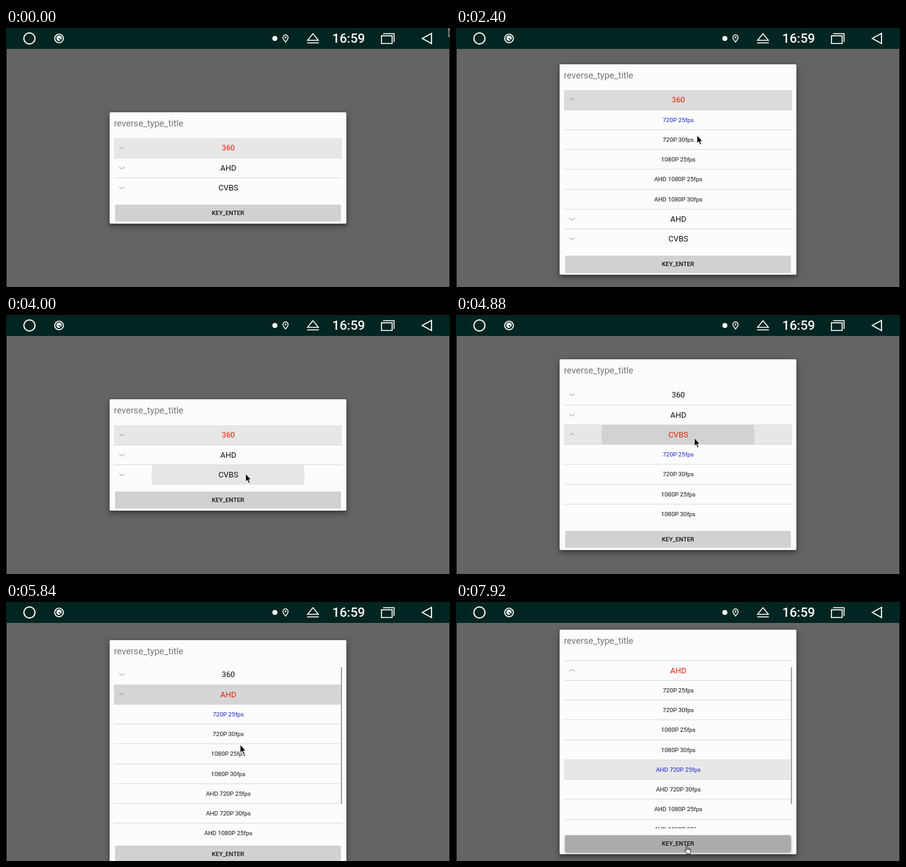
Recreate the animation shown at these times as an HTML page. Size 720 by 421 pixels, loop 8 s.

```html
<!DOCTYPE html>
<html lang="en">
<head>
<meta charset="utf-8">
<title>Reverse type dialog</title>
<style>
html, body { margin: 0; width: 100%; height: 100%; overflow: hidden; background: #000; }
#stage { position: absolute; left: 0; top: 0; width: 720px; height: 421px; overflow: hidden; font-family: Roboto, sans-serif; }
#stage div, #stage svg { position: absolute; box-sizing: border-box; }
#dim { left: 1px; top: 33px; width: 718px; height: 388px; background: #646464; }
#bar { left: 0; top: 0; width: 720px; height: 34px; background: #022521; }
#icons, #pointer { left: 0; top: 0; overflow: visible; }
#clock { left: 529px; top: 4px; width: 53px; line-height: 26px; font-size: 21px; font-weight: 500; color: #fff; white-space: nowrap; }
#dialog { left: 168px; top: 0; width: 384px; background: #fcfcfc; border-radius: 2px; box-shadow: 0 3px 6px rgba(0,0,0,.3), 0 4px 12px rgba(0,0,0,.24); }
#title { left: 7px; top: 8.4px; line-height: 20px; font-size: 14.6px; color: #757575; }
#list { left: 7px; top: 42.3px; width: 370px; overflow: hidden; }
#rows { left: 0; top: 0; width: 370px; }
.row { left: 0; width: 370px; height: 32.25px; line-height: 32.25px; padding-left: 1px; text-align: center; color: #111; font-size: 9.85px; border-bottom: 1px solid #dadada; overflow: hidden; white-space: nowrap; }
.row:last-of-type { border-bottom: 0; }
.row.group { font-size: 12.8px; }
.row.on { background: #e7e7e7; }
.row.red { color: #e5220e; }
.row.blue { color: #1620cc; }
.row span { position: relative; }
.row svg { left: 8px; top: 13px; }
.row svg.up { top: 12px; }
.ripple { border-radius: 50%; background: #000; }
#thumb { left: 367.5px; width: 3px; background: #9fa2a1; }
#button { left: 9px; width: 366px; height: 27.5px; line-height: 27px; text-align: center; font-size: 9.9px; font-weight: 500; color: #111; border-radius: 1.5px; }
</style>
</head>
<body>
<div id="stage">
  <div id="dim"></div>
  <div id="dialog">
    <div id="title">reverse_type_title</div>
    <div id="list"><div id="rows"></div><div id="thumb"></div></div>
    <div id="button">KEY_ENTER</div>
  </div>
  <div id="bar"></div>
  <svg id="icons" width="720" height="34" fill="none" stroke="#fff">
    <circle cx="38" cy="17" r="9" stroke-width="2"/>
    <circle cx="86" cy="17" r="7" stroke-width="1.7"/>
    <circle cx="86" cy="16.6" r="4.3" fill="#fff" stroke="none"/>
    <path d="M85.5 16.5l5 5" stroke="#022521" stroke-width="1.6"/>
    <circle cx="436" cy="17" r="4" fill="#fff" stroke="none"/>
    <path d="M453.3 22.8c-2.8-3.4-4.2-5.4-4.2-7.4a4.2 4.2 0 0 1 8.4 0c0 2-1.4 4-4.2 7.4z" stroke-width="1.4"/>
    <circle cx="453.3" cy="15.3" r="1.5" fill="#fff" stroke="none"/>
    <path d="M497.8 9.2L506.6 20H489zM488.3 24.3h19" stroke-width="1.5"/>
    <path d="M608.8 12.6h17.4v12.6h-17.4zM611.5 9.2h17.8v13.6" stroke-width="1.6"/>
    <path d="M675 17L690 8.7v16.6z" stroke-width="1.8"/>
  </svg>
  <div id="clock">16:59</div>
  <svg id="pointer" width="20" height="24" stroke-linejoin="round">
    <path id="arrow" d="M.5 .8V14.2L3.4 11.5L5.6 16.4L7.8 15.4L5.7 10.7H9.6z" fill="#0a0a0a" stroke="#fff" stroke-width=".9"/>
    <path id="hand" d="M2.2 1.3c0-1.3 2-1.3 2 0v4.8c.5-.7 1.8-.5 1.9.4c.6-.6 1.8-.3 1.9.6c.7-.4 1.6 0 1.6 1v2.8c0 1.7-1 2.3-1.1 4H3.2c-.2-1.9-2.2-3.5-3.1-5.2c-.5-1.1.8-1.8 1.5-.9l.6.9zM4.2 6v2.6M6.1 6.6v2.2M8 7.2v1.8" fill="#fff" stroke="#111" stroke-width=".95"/>
  </svg>
</div>
<script>
const LOOP = 8000, STEP = 80, ROW = 32.25, BASE = 84, MAX = 364.5, MID = 227.2;
const $ = id => document.getElementById(id);

const MODES = {
  360: ['720P 25fps', '720P 30fps', '1080P 25fps', 'AHD 1080P 25fps', 'AHD 1080P 30fps'],
  AHD: ['720P 25fps', '720P 30fps', '1080P 25fps', '1080P 30fps', 'AHD 720P 25fps', 'AHD 720P 30fps', 'AHD 1080P 25fps', 'AHD 1080P 30fps'],
  CVBS: ['720P 25fps', '720P 30fps', '1080P 25fps', '1080P 30fps']
};

// time, open group, selected group, picked child
const STATES = [
  [0, '', '360', 0],
  [2206, '360', '360', 0],
  [3246, '', '360', 0],
  [4046, 'CVBS', 'CVBS', 0],
  [4926, '', 'CVBS', 0],
  [5726, 'AHD', 'AHD', 0],
  [6720, 'AHD', 'AHD', 4]
];

// time, row label, child index (-1 for a group), strength
const TAPS = [
  [2080, '360', -1, .09],
  [3125, '360', -1, .09],
  [3920, 'CVBS', -1, .09],
  [4800, 'CVBS', -1, .09],
  [5600, 'AHD', -1, .09],
  [6600, 'AHD', 4, .165]
];

// start, end, x, y
const MOVES = [
  [0, 0, 717.6, 0],
  [800, 1600, 399.5, 157],
  [1600, 1840, 386, 194.5],
  [2160, 2880, 402.5, 113],
  [3280, 3840, 388, 257],
  [4080, 4640, 386, 199],
  [4960, 5440, 379.3, 231],
  [5920, 6400, 387.6, 272],
  [7280, 7600, 371, 394.5]
];

const clamp = v => Math.max(0, Math.min(1, v));
const span = (t, a, b) => b > a ? clamp((t - a) / (b - a)) : +(t >= a);
const mix = (a, b, p) => a + (b - a) * p;
const smooth = p => p * p * (3 - 2 * p);
const inOut = p => p < .5 ? 4 * p ** 3 : 1 - (2 - 2 * p) ** 3 / 2;
const quint = p => 1 - (1 - p) ** 5;

const fullHeight = open => (3 + (open ? MODES[open].length : 0)) * ROW;
const dialogHeight = open => Math.min(MAX, BASE + fullHeight(open));
const topOf = open => MID - dialogHeight(open) / 2;

const chevron = up => `<svg class="${up ? 'up' : ''}" width="10" height="6" fill="none" stroke="#8c8c8c"><path d="${up ? 'M.5 4.5L4.7 1.2L8.9 4.5' : 'M.5 1L4.7 4.3L8.9 1'}"/></svg>`;

let ripples = {}, shown = -1;

function build(index) {
  const [, open, sel, pick] = STATES[index];
  let n = 0, html = '';
  const add = (cls, text, key, icon = '') => {
    html += `<div class="row ${cls}" data-key="${key}" style="top:${n++ * ROW}px"><div class="ripple"></div>${icon}<span>${text}</span></div>`;
  };
  for (const name of ['360', 'AHD', 'CVBS']) {
    const cls = name === sel ? 'red' + (pick ? '' : ' on') : '';
    add('group ' + cls, name, name + -1, chevron(name === open));
    if (name === open) MODES[name].forEach((text, i) =>
      add(i === pick ? 'blue' + (pick ? ' on' : '') : '', text, name + i));
  }
  $('rows').innerHTML = html;
  ripples = {};
  for (const row of $('rows').children) ripples[row.dataset.key] = row.firstChild;

  const h = dialogHeight(open), view = h - BASE, full = fullHeight(open);
  $('dialog').style.height = h + 'px';
  $('list').style.height = view + 'px';
  $('button').style.top = h - 31 + 'px';
  $('thumb').style.display = full > view + 1 ? '' : 'none';
  $('thumb').style.height = view * view / full + 'px';
  shown = index;
}

function drawRipples(t) {
  for (const key in ripples) ripples[key].style.opacity = 0;
  for (const [start, name, child, power] of TAPS) {
    const dot = ripples[name + child], age = t - start;
    if (!dot || age < 0 || age > 460) continue;
    const r = Math.min(200, age * 1.55);
    dot.style.cssText = `left:${185 - r}px;top:${ROW / 2 - r}px;width:${2 * r}px;height:${2 * r}px;opacity:${power * (1 - span(age, 205, 460))}`;
  }
}

function drawPointer(t) {
  let [, , x, y] = MOVES[0];
  for (const [a, b, nx, ny] of MOVES) {
    if (t < a) break;
    const p = smooth(span(t, a, b));
    x = mix(x, nx, p);
    y = mix(y, ny, p);
  }
  const hand = y > 378;
  $('pointer').style.transform = `translate(${x}px,${y}px)`;
  $('arrow').style.display = hand ? 'none' : '';
  $('hand').style.display = hand ? '' : 'none';
}

function render(t) {
  let i = STATES.length - 1;
  while (STATES[i][0] > t) i--;
  if (i !== shown) build(i);
  const [since, open] = STATES[i], before = STATES[Math.max(0, i - 1)][1];
  const top = Math.round(mix(topOf(before), topOf(open), quint(span(t, since, since + 400))));
  $('dialog').style.transform = `translateY(${top}px)`;

  const scroll = open === 'AHD' ? Math.round(24 * inOut(span(t, 5730, 6150))) : 0;
  $('rows').style.transform = `translateY(${-scroll}px)`;
  $('thumb').style.top = scroll * (dialogHeight(open) - BASE) / fullHeight(open) + 'px';

  const press = span(t, 7680, 7920), c = mix(208, 170, press);
  $('button').style.background = `rgb(${c},${c + 2},${c + 1})`;
  $('button').style.boxShadow = `0 ${mix(.5, 2, press)}px ${mix(1, 4, press)}px rgba(0,0,0,${mix(.18, .4, press)})`;

  drawRipples(t);
  drawPointer(t);
}

const origin = performance.now();
function tick() {
  const t = Math.max(0, performance.now() - origin) % LOOP;
  render(Math.floor(t / STEP) * STEP);
  requestAnimationFrame(tick);
}
tick();
</script>
</body>
</html>
```
